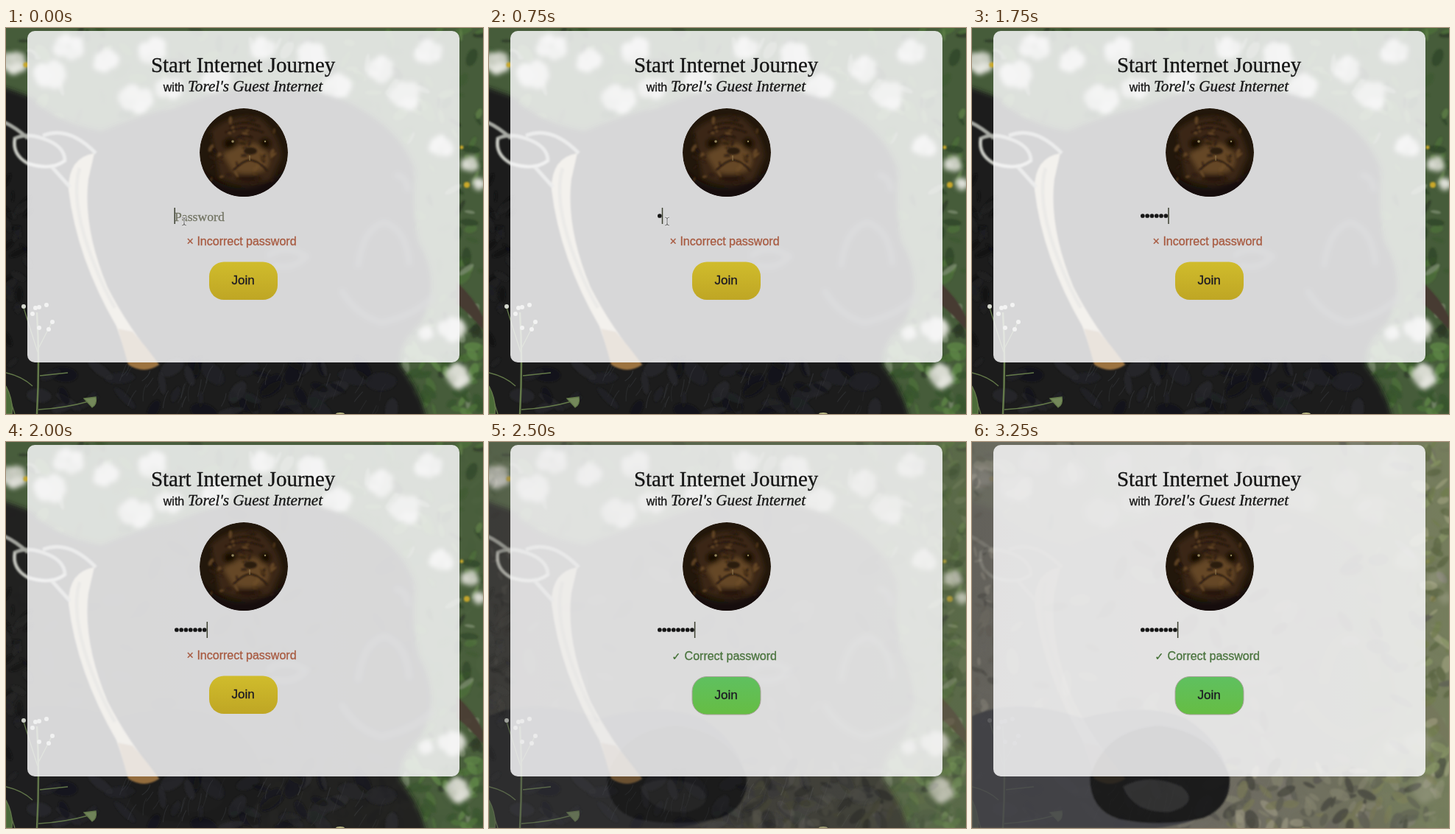
Write an HTML page that moves like this. It is 648x524 px and loops after 3.5 s.

```html
<!DOCTYPE html>
<html lang="en">
<head>
<meta charset="utf-8">
<title>Guest sign-in</title>
<style>
  html, body { margin: 0; width: 100%; height: 100%; overflow: hidden; background: #222; }
  svg { display: block; width: 648px; height: 524px; }
  .serif { font-family: "Liberation Serif", Times, serif; }
  .sans { font-family: "Liberation Sans", Arial, sans-serif; font-size: 16px; }
  .check { font-family: "DejaVu Sans", sans-serif; font-size: 14px; }
  .join { font-size: 17px; fill: #1b1924; stroke: #1b1924; }
  .ink { stroke-width: .3px; }
</style>
</head>
<body>
<svg viewBox="0 0 648 524" xmlns="http://www.w3.org/2000/svg">
  <defs>
    <filter id="soft" x="-10%" y="-10%" width="120%" height="120%"><feGaussianBlur stdDeviation="3"/></filter>
    <filter id="slight" x="-10%" y="-10%" width="120%" height="120%"><feGaussianBlur stdDeviation="1.3"/></filter>
    <linearGradient id="yellow" x2="0" y2="1"><stop stop-color="#d0bc2c"/><stop offset="1" stop-color="#bfa624"/></linearGradient>
    <linearGradient id="green" x2="0" y2="1"><stop stop-color="#5fc060"/><stop offset="1" stop-color="#66bd43"/></linearGradient>
    <linearGradient id="ground" x2="1" y2="0"><stop stop-color="#6f6d66"/><stop offset=".6" stop-color="#7d7a6c"/><stop offset="1" stop-color="#7c8262"/></linearGradient>
    <clipPath id="round"><circle cx="323" cy="169" r="60"/></clipPath>
  </defs>

  <g id="meadow">
    <rect width="648" height="524" fill="#465c3a"/>
    <g id="grass" filter="url(#slight)"></g>
    <g id="flowers" filter="url(#soft)"></g>
    <g filter="url(#slight)">
      <path d="M612 345Q635 365 648 392V410Q630 388 612 374Z" fill="#463a32"/>
      <g fill="#c9a82a"><circle cx="27" cy="50" r="3.5"/><circle cx="619" cy="162" r="2.5"/><circle cx="626" cy="213" r="4"/></g>
    </g>
    <g filter="url(#soft)">
      <path d="M-10 78L30 92Q70 130 130 140Q180 118 235 106Q290 82 350 80Q440 82 485 112Q540 145 556 195Q550 240 560 290Q592 345 565 398Q530 430 535 458Q562 490 572 534H-10Z" fill="#1b1c1e"/>
      <g fill="none" stroke="#505257" stroke-width="7" opacity=".6">
        <path d="M355 310Q378 292 408 310Q390 330 362 322M478 325Q485 270 515 264Q545 275 548 322M455 355Q475 390 510 400Q555 390 580 365M528 200Q545 200 546 222"/>
      </g>
    </g>
    <g id="fur" filter="url(#slight)"></g>
    <g id="hair" fill="none" stroke="#3b3d41" stroke-width="1.2"></g>
    <g filter="url(#slight)">
      <path d="M120 170Q84 176 85 220Q96 312 150 405L168 458Q190 468 208 457Q165 405 138 352Q104 270 112 205Z" fill="#d6c8a8"/>
      <path d="M100 190Q88 230 112 300Q130 350 148 380" fill="none" stroke="#a39c85" stroke-width="5"/>
      <path d="M152 408L166 457Q188 471 208 457Q190 432 172 412Z" fill="#9c7340"/>
      <g fill="none" stroke-width="5" stroke="#a6a8a2">
        <path d="M-4 127Q15 136 30 150M122 170Q85 132 50 146M60 186L87 216"/>
        <path d="M12 150Q8 172 30 184Q62 194 80 180Q80 160 50 150Q28 142 12 150Z"/>
        <path d="M12 150Q8 172 30 184Q62 194 80 180" stroke="#d4d5cf" stroke-width="2"/>
      </g>
    </g>
    <g fill="none" stroke="#647a4a" stroke-width="1.3">
      <path d="M42 524Q46 450 42 386" stroke-width="2.5"/>
      <path d="M43 440L24 380M44 435L62 400M0 468Q22 473 36 486M46 472L84 468M44 518Q80 516 112 507M0 487L12 524"/>
      <path d="M106 503L122 501Q124 511 117 515Z" fill="#74885a"/>
      <path d="M0 486Q10 505 8 524H0Z" fill="#4b6b38"/>
    </g>
    <g id="buds" fill="#d5d8cf"></g>
    <ellipse cx="454" cy="524" rx="6" ry="2" fill="#b9b884"/>
  </g>

  <g id="trail">
    <rect width="648" height="524" fill="url(#ground)"/>
    <g id="leaves" filter="url(#slight)"></g>
    <g filter="url(#slight)">
      <path d="M0 372Q60 345 150 375Q235 352 290 375Q345 410 350 465Q340 515 250 524H0Z" fill="#4a4a4d"/>
      <path d="M160 455Q180 390 255 385Q330 395 350 455Q352 495 315 510Q260 524 200 512Q160 500 160 455Z" fill="#1d1d1e"/>
      <path d="M205 468Q240 448 285 468Q310 490 270 502Q220 505 205 468Z" fill="#343435"/>
    </g>
  </g>

  <rect x="29" y="4" width="587" height="450" rx="10" fill="#f8f8f9" fill-opacity=".85"/>
  <g class="ink" fill="#141414" stroke="#141414">
    <text class="serif" x="197" y="60" font-size="28.9">Start Internet Journey</text>
    <text class="sans" x="213.8" y="86">with</text>
    <text class="serif" x="247" y="86" font-size="21.2" font-style="italic">Torel's Guest Internet</text>
  </g>

  <g clip-path="url(#round)">
    <circle cx="323" cy="169" r="60" fill="#22170b"/>
    <g filter="url(#soft)">
      <path d="M262 190Q320 245 384 188V240H262Z" fill="#160f08"/>
      <path d="M278 140Q305 115 345 122Q372 145 374 175L360 205Q325 220 290 202Z" fill="#3a2612"/>
      <path d="M295 172Q322 150 348 160Q364 178 352 192Q330 203 308 194Z" fill="#654725"/>
      <ellipse cx="304" cy="157" rx="9" ry="8" fill="#150d06"/>
      <ellipse cx="352" cy="157" rx="8" ry="8" fill="#150d06"/>
      <ellipse cx="330" cy="204" rx="18" ry="4" fill="#1b1109"/>
    </g>
    <g filter="url(#slight)">
      <g id="coat"></g>
      <g fill="none" stroke="#20140a" stroke-width="2">
        <path d="M298 142Q322 130 350 142M304 134Q323 123 345 134M312 150Q323 142 335 149M309 193Q322 180 332 179Q346 182 355 194"/>
      </g>
      <ellipse cx="332" cy="167" rx="9" ry="5" fill="#2a1c10"/>
    </g>
    <g fill="#93875f"><circle cx="308" cy="154" r="1.8"/><circle cx="352" cy="154" r="1.2"/></g>
    <path d="M331 173V180" stroke="#9a8054"/>
  </g>

  <text id="hint" class="serif ink" x="229" y="262" font-size="17.7" fill="#727463" stroke="#727463">Password</text>
  <g id="dots" fill="#161616"></g>
  <path id="caret" d="M0 244V266" stroke="#3c4030" stroke-width="1.5"/>
  <g id="pointer" fill="none" stroke-width="1.2">
    <path d="M239 257Q242 257 242 260V265Q242 268 239 268M245 257Q242 257 242 260M242 265Q242 268 245 268" stroke="#f4f4f4" stroke-width="2.6"/>
    <path d="M239 257Q242 257 242 260V265Q242 268 239 268M245 257Q242 257 242 260M242 265Q242 268 245 268" stroke="#777"/>
  </g>

  <g id="wrong" class="ink">
    <text class="sans" x="245.6" y="295" fill="#a85a40" stroke="#a85a40">× Incorrect password</text>
    <rect x="276" y="317.5" width="93" height="51.5" rx="20" fill="url(#yellow)"/>
    <text class="sans join" x="306.6" y="348">Join</text>
  </g>
  <g id="right" class="ink">
    <text class="check" x="248.5" y="295.5" fill="#3f6e31" stroke="#3f6e31">✓</text>
    <text class="sans" x="265.6" y="296" fill="#4a743e" stroke="#4a743e">Correct password</text>
    <rect x="276" y="318.5" width="93" height="51.5" rx="20" fill="url(#green)" stroke="#aaa39c" stroke-width="1"/>
    <text class="sans join" x="306.6" y="349">Join</text>
  </g>
</svg>
<script>
  const LOOP = 3500, STEP = 250, SOLVED = 2250, LENGTH = 8;
  const FIELD_X = 228.7, PITCH = 6.3;
  const $ = id => document.getElementById(id);

  function add(parent, tag, attrs) {
    const el = document.createElementNS("http://www.w3.org/2000/svg", tag);
    for (const k in attrs) el.setAttribute(k, attrs[k]);
    return parent.appendChild(el);
  }

  let seed = 7;
  function random(a, b) {
    seed = (seed * 16807) % 2147483647;
    return a + (b - a) * seed / 2147483647;
  }
  const pick = list => list[Math.floor(random(0, list.length))];

  function scatter(id, count, [x0, x1, y0, y1], size, colors) {
    for (let i = 0; i < count; i++) {
      const x = random(x0, x1), y = random(y0, y1), r = random(size / 2, size);
      add($(id), "ellipse", {
        cx: x, cy: y, rx: r, ry: r * random(.25, .6), fill: pick(colors),
        opacity: .75, transform: `rotate(${random(0, 180)} ${x} ${y})`
      });
    }
  }

  // A flower is a clump of overlapping petals.
  function flower(x, y, r) {
    for (let i = 0; i < 6; i++) {
      const a = i * Math.PI / 3 + random(0, .8), d = r * .55;
      add($("flowers"), "circle", {
        cx: x + d * Math.cos(a), cy: y + d * .8 * Math.sin(a),
        r: r * random(.35, .6), fill: pick(["#d9dbd2", "#c8ccc0", "#e4e5de"])
      });
    }
  }

  const greens = ["#2f4427", "#3c5a30", "#4d7039", "#5f8048"];
  scatter("grass", 110, [0, 648, 0, 130], 14, ["#2b3826", "#3a4a33", "#8a9880", ...greens]);
  scatter("grass", 90, [535, 648, 100, 524], 13, ["#2b3826", "#7c8d70", ...greens]);
  scatter("grass", 45, [530, 648, 430, 524], 14, ["#37542b", "#4d7338", "#5f8848"]);

  [[12, 46, 17], [62, 62, 22], [85, 25, 22], [135, 45, 18], [178, 96, 23], [222, 82, 18],
   [200, 30, 20], [286, 72, 20], [350, 28, 17], [415, 38, 22], [448, 80, 20],
   [510, 55, 20], [543, 92, 22], [575, 32, 20], [590, 160, 17], [630, 184, 12],
   [642, 212, 9], [604, 408, 19], [614, 472, 18], [570, 415, 11]
  ].forEach(f => flower(...f));

  scatter("fur", 50, [0, 530, 455, 524], 22, ["#141517", "#212326", "#282a2d"]);
  scatter("fur", 25, [0, 30, 200, 455], 14, ["#121314", "#1f2022"]);
  scatter("coat", 45, [275, 372, 120, 215], 6, ["#1c1209", "#2c1c0d", "#553a1c", "#6d4d29"]);

  for (let i = 0; i < 45; i++) {
    const x = random(130, 530), y = random(455, 515);
    add($("hair"), "path", {
      d: `M${x} ${y}q${random(-8, 0)} 8 ${random(-12, -4)} ${random(12, 26)}`, opacity: random(.2, .6)
    });
  }

  [[24, 378], [45, 379], [55, 376], [36, 388], [63, 399], [45, 407], [58, 409], [40, 380]]
    .forEach(([cx, cy]) => add($("buds"), "circle", { cx, cy, r: 3 }));

  scatter("leaves", 150, [0, 648, 0, 524], 19, ["#62605a", "#77736a", "#89857a"]);
  scatter("leaves", 100, [350, 648, 440, 524], 15, ["#4e4d43", "#67675a", "#929078", "#aaa58d", "#85865f"]);
  scatter("leaves", 65, [605, 648, 0, 450], 13, ["#626a48", "#788153", "#929c6c", "#a6a584"]);
  scatter("leaves", 45, [0, 30, 0, 370], 9, ["#55544f", "#68665e", "#8b877c"]);

  const dots = Array.from({ length: LENGTH }, (_, i) =>
    add($("dots"), "circle", { cx: FIELD_X + PITCH * (i + .5), cy: 255, r: 2.85 }));

  const show = (el, on) => el.setAttribute("visibility", on ? "visible" : "hidden");
  const clamp = (v, a, b) => Math.min(b, Math.max(a, v));

  // Steady while typing, then blinking once a second.
  function caretOn(t) {
    const typing = t >= 750 && t < SOLVED;
    return typing || (t + LOOP - SOLVED) % LOOP % 1000 < 500;
  }

  function draw(time) {
    const t = Math.floor(time % LOOP / STEP) * STEP;
    const typed = clamp(Math.floor((t - 550) / 200), 0, LENGTH);
    const solved = t >= SOLVED;
    dots.forEach((dot, i) => show(dot, i < typed));
    show($("hint"), typed === 0);
    show($("caret"), caretOn(t));
    $("caret").setAttribute("transform", `translate(${FIELD_X + PITCH * typed + .5} 0)`);
    show($("pointer"), t < 1500);
    show($("wrong"), !solved);
    show($("right"), solved);
    $("trail").setAttribute("opacity", clamp((t - 1900) / 1550, 0, 1));
  }

  const start = performance.now();
  function tick() {
    draw(performance.now() - start);
    requestAnimationFrame(tick);
  }
  tick();
</script>
</body>
</html>
```
